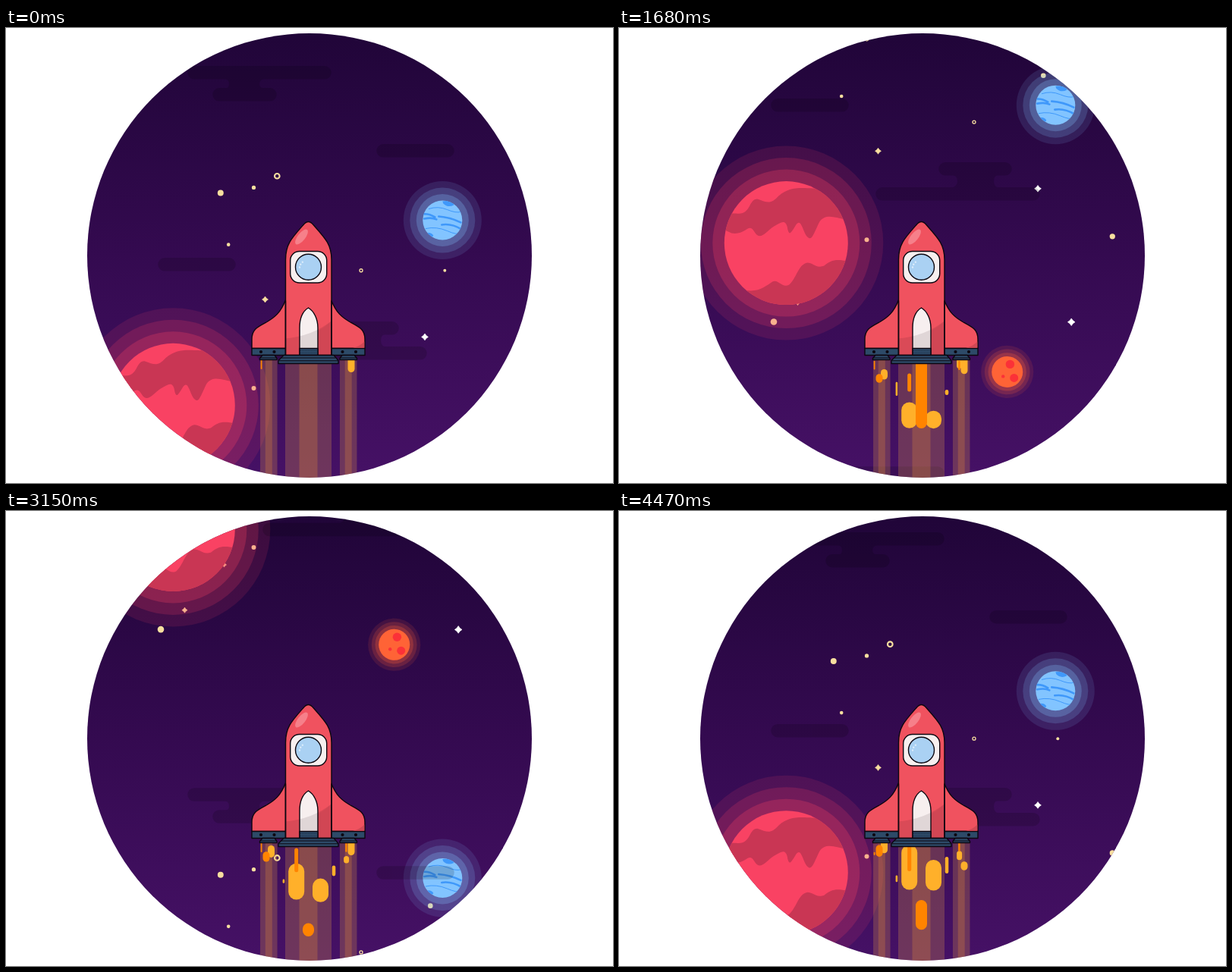
Recreate the animation shown at these times as an HTML page. Size 800 by 600 pixels, loop 4500 ms.

```html
<!DOCTYPE html>
<html>
<head>
<meta charset="utf-8">
<title>Rocket</title>
<style>
html, body { margin: 0; width: 100%; height: 100%; overflow: hidden; background: #fff; }
svg { display: block; width: 100vw; height: 100vh; }
</style>
</head>
<body>
<svg viewBox="0 0 800 600" xmlns="http://www.w3.org/2000/svg">
  <defs>
    <linearGradient id="sky" x1="0" y1="0" x2="0" y2="1">
      <stop offset="0" stop-color="#200538"/>
      <stop offset=".5" stop-color="#340a50"/>
      <stop offset="1" stop-color="#461166"/>
    </linearGradient>
    <clipPath id="port"><circle cx="400" cy="300" r="293"/></clipPath>
    <clipPath id="pinkDisc"><circle r="81.5"/></clipPath>
    <clipPath id="blueDisc"><circle r="26"/></clipPath>

    <g id="stars"></g>

    <g id="pink">
      <path clip-path="url(#pinkDisc)" fill="#c93654" d="M-90 -39H-66C-46 -36 -50 -58 -38 -58C-24 -53 -20 -51 -10 -62
        C4 -74 16 -73 36 -72L95 -80V-31H78C66 -33 52 -40 44 -28C36 -12 34 -2 28 -8C22 -14 20 -34 13 -24
        C6 -12 4 -10 2 -18C0 -32 -6 -28 -16 -22C-28 -14 -34 -2 -42 -15C-50 -28 -52 -10 -72 -13L-95 -24Z
        M-75 58L-55 62C-36 66 -26 56 -18 51C-10 47 -6 60 4 55C14 46 16 28 28 26C36 26 40 34 50 30C60 22 66 20 90 26V90H-75Z"/>
    </g>

    <g id="blue">
      <g clip-path="url(#blueDisc)" fill="none" stroke="#3f98fa" stroke-linecap="round">
        <path stroke-width="2.6" d="M-26 -8Q-18 -9 -10 -4M-5 -5Q10 -4 24 3M-24 -2Q-14 -4 -8 -1M-1 6Q12 4 25 12"/>
        <path stroke-width="1" d="M-18 -15Q-6 -19 6 -14T24 -11M-22 11Q-8 8 6 14T22 17"/>
        <path stroke="none" fill="#3f98fa" d="M0 -25Q14 -27 15 -20Q7 -16 1 -22ZM-22 17Q-15 15 -12 20Q-13 23 -20 22Z"/>
      </g>
    </g>

    <g id="orange">
      <g fill="#fb3138"><circle cx="3.7" cy="-10" r="5.7"/><circle cx="9" cy="8" r="5.5"/><circle cx="-5.5" cy="6" r="2.2"/></g>
    </g>

    <g id="clouds" opacity=".15" stroke="#000" stroke-width="17.5" stroke-linecap="round">
      <path d="M248 126H420M281 155H348M497 229H582M209 379H294M430 463H509M347 496H546"/>
      <path stroke="none" d="M286 134Q294 134 294 141T286 147H342Q334 147 334 141T342 134ZM437 471Q446 471 446 479T437 488H503Q494 488 494 479T503 471Z"/>
    </g>

    <path id="hullShape" d="M368.5 432V306C368.5 286 376 278 392 260Q398.5 252 405 260C421 278 429 286 429 306V432Z"/>
    <clipPath id="hull"><use href="#hullShape"/></clipPath>

    <g id="wing">
      <path d="M368.5 359C362 376 354 382 344 388C331 395 324 398 324 411V423H368.5Z" fill="#f0525f"/>
      <g fill="#2d4a68">
        <rect x="324" y="423" width="44.5" height="9"/>
        <path d="M338 432H354L357 436V438H334.5V436Z"/>
      </g>
      <path d="M335 435.5H357" stroke-width="1"/>
      <path d="M336 427.5h.01M353.5 427.5h.01" stroke-width="4.2" stroke-linecap="round"/>
    </g>
  </defs>

  <g clip-path="url(#port)">
    <rect width="800" height="600" fill="url(#sky)"/>
    <g id="space"></g>
    <g id="trails" opacity=".22"></g>
    <g id="fire"></g>
  </g>

  <g transform="translate(0 -.5)" stroke="#0c0710" stroke-width="1.4" stroke-linejoin="round">
    <use href="#wing"/>
    <use href="#wing" transform="matrix(-1 0 0 1 797 0)"/>
    <path d="M457 422.3Q467 420 472.3 414V422.3Z" fill="#d04855" stroke="none"/>
    <use href="#hullShape" fill="#f0525f"/>
    <path d="M387 432V396C387 384 391 374 398.5 369.5C406 374 411 384 411 396V432Z" fill="#f7efef"/>
    <g clip-path="url(#hull)" stroke="none" fill="#2a0a18">
      <path d="M368 410Q404 407 430 386V432H368Z" opacity=".11"/>
      <path d="M411.5 400Q421 394 430 386V432H411.5Z" opacity=".05"/>
    </g>
    <path d="M368.5 360V432M429 360V432"/>
    <g fill="#2d4a68">
      <rect x="387" y="423" width="24" height="9"/>
      <path d="M366 432H432L438 439V443H359V439Z"/>
    </g>
    <path d="M363 435.5H434M360 439.3H437" stroke-width="1"/>
    <path d="M388 426H410M388 429H410" stroke="#16263a" stroke-width=".8" stroke-dasharray="1 1"/>
    <ellipse cx="389.5" cy="276" rx="5" ry="12" transform="rotate(38 389.5 276)" fill="#f6808a" stroke="none"/>
    <rect x="374.7" y="295" width="48" height="41.5" rx="12" fill="#f7efef"/>
    <circle cx="398.5" cy="315.7" r="17" fill="#aad1f3"/>
    <path d="M387 316Q387.5 312 391 309" fill="none" stroke="#dcecfa" stroke-width="2.4" stroke-linecap="round" stroke-dasharray="0 4"/>
  </g>
</svg>

<script>
const NS = 'http://www.w3.org/2000/svg';
const LOOP = 4500, STEP = 30, CYCLE = 75;
const CREAM = '#f8df9f';
const byId = id => document.getElementById(id);
const mix = (a, b, k) => a + (b - a) * k;

function add(parent, tag, attrs) {
  const el = document.createElementNS(NS, tag);
  for (const k in attrs) el.setAttribute(k, attrs[k]);
  return parent.appendChild(el);
}

// Stars, each kind listed from large to small
const sky = byId('stars');
const dots = [[204, 504.7], [282.8, 139], [650.3, 392], [559.3, 180], [326.5, 396.5], [326.5, 132], [293.2, 207.2], [578.3, 241.3]];
const sparks = [[596.2, 505], [552, 329], [341.5, 279.5], [235.5, 479.3], [287.5, 419.5]];
const rings = [[357.3, 116.8], [468, 241.3]];

dots.forEach(([cx, cy], i) => add(sky, 'circle', { cx, cy, r: 4.3 - i / 3, fill: CREAM }));
rings.forEach(([cx, cy], i) => {
  const r = 3.3 - 1.3 * i;
  add(sky, 'circle', { cx, cy, r, fill: 'none', stroke: CREAM, 'stroke-width': r * 0.65 });
});
sparks.forEach(([x, y], i) => {
  const color = i < 2 ? '#fff' : CREAM;
  add(sky, 'path', {
    d: 'M0 -1L.42 -.42L1 0L.42 .42L0 1L-.42 .42L-1 0L-.42 -.42Z',
    transform: `translate(${x} ${y}) scale(${4.8 - 0.4 * i})`,
    fill: color, stroke: color, 'stroke-width': 0.15, 'stroke-linejoin': 'round'
  });
});

// Planet disc with three halo rings, placed beneath its markings
function glow(id, r, gap, color) {
  const g = byId(id), marks = g.firstElementChild;
  for (let i = 3; i >= 0; i--)
    g.insertBefore(add(g, 'circle', { r: r + gap * i, fill: color, opacity: i ? 0.33 - 0.07 * i : 1 }), marks);
}
glow('pink', 81.5, 15.5, '#f94263');
glow('blue', 26, 8.5, '#82c4ff');
glow('orange', 20.5, 4.7, '#ff6336');

// Exhaust: a wide column with a narrow core below each nozzle
function trail(x, width, core) {
  const column = (w, fill, opacity) =>
    add(byId('trails'), 'rect', { x: x - w / 2, y: 436, width: w, height: 164, fill, opacity });
  column(width, '#fdb841', 1);
  column(core, '#ffa030', 1);
}
byId('trails').removeAttribute('opacity');
for (const [x, w, core] of [[346.3, 22.5, 9], [398.5, 61, 24], [451.2, 22.5, 9]]) trail(x, w, core);
for (const bar of byId('trails').children) bar.setAttribute('opacity', 0.22);

// A layer passes y at step mid and sweeps amp pixels to either side.
const leads = [CYCLE + 1, 0, -CYCLE];
function layer(id, x, y, amp, mid, rate = 0.0213) {
  const copies = leads.map(() => add(byId('space'), 'use', { href: '#' + id }));
  return n => copies.forEach((el, i) => {
    const turn = (n + leads[i] - mid) * rate;
    const a = Math.max(-Math.PI / 2, Math.min(Math.PI / 2, turn));
    el.setAttribute('transform', `translate(${x} ${(y + amp * Math.sin(a)).toFixed(2)})`);
  });
}
const layers = [
  layer('stars', 0, 0, 582, 68, 0.0169),
  layer('pink', 220.3, 332.3, 509, 60.5),
  layer('blue', 575.3, 310.5, 384, 83),
  layer('orange', 511.7, 346, 508, 46),
  layer('clouds', 0, 0, 527, 82)
];

// A flame stretches from the nozzle, then its tail catches up with its tip.
const PULSE = 5, NOZZLE = 430;
function flame(x, w, tip, hot, first) {
  const el = add(byId('fire'), 'rect', { x: x - w / 2, width: w, rx: w / 2, fill: hot ? '#ff8400' : '#ffb02a' });
  const end = tip + 2.2 * w;
  const tail = Math.max(NOZZLE, tip - 7 * w);
  return n => {
    const k = n - first;
    el.setAttribute('visibility', k < 0 ? 'hidden' : 'visible');
    if (k < 0) return;
    const q = (k % PULSE) / (PULSE - 1), e = q * q * (2.2 - 1.2 * q);
    const top = mix(tail, end - w - 2.5, e);
    el.setAttribute('y', top);
    el.setAttribute('height', mix(tip, end, e) - top);
  };
}
// [x, width, tip, hot], fired one step apart in this order
const flames = [
  [448.6, 7, 449], [414.5, 21, 482], [382.7, 21, 494], [382.7, 5, 475, true],
  [455, 9, 454], [365.9, 2.6, 485], [432, 4.6, 474], [349.5, 9, 449],
  [448.4, 2.4, 449, true], [336.6, 1.8, 450, true], [398.5, 15, 528, true], [343, 9, 448, true]
].map(([x, w, tip, hot], i) => flame(x, w, tip, hot, (i + 1) % PULSE));

function draw(time) {
  const n = Math.floor((time % LOOP) / STEP);
  for (const move of layers) move(n);
  for (const burn of flames) burn(n);
}

let start;
function tick(now) {
  if (start === undefined) start = now;
  draw(now - start);
  requestAnimationFrame(tick);
}
draw(0);
requestAnimationFrame(tick);
</script>
</body>
</html>
```
